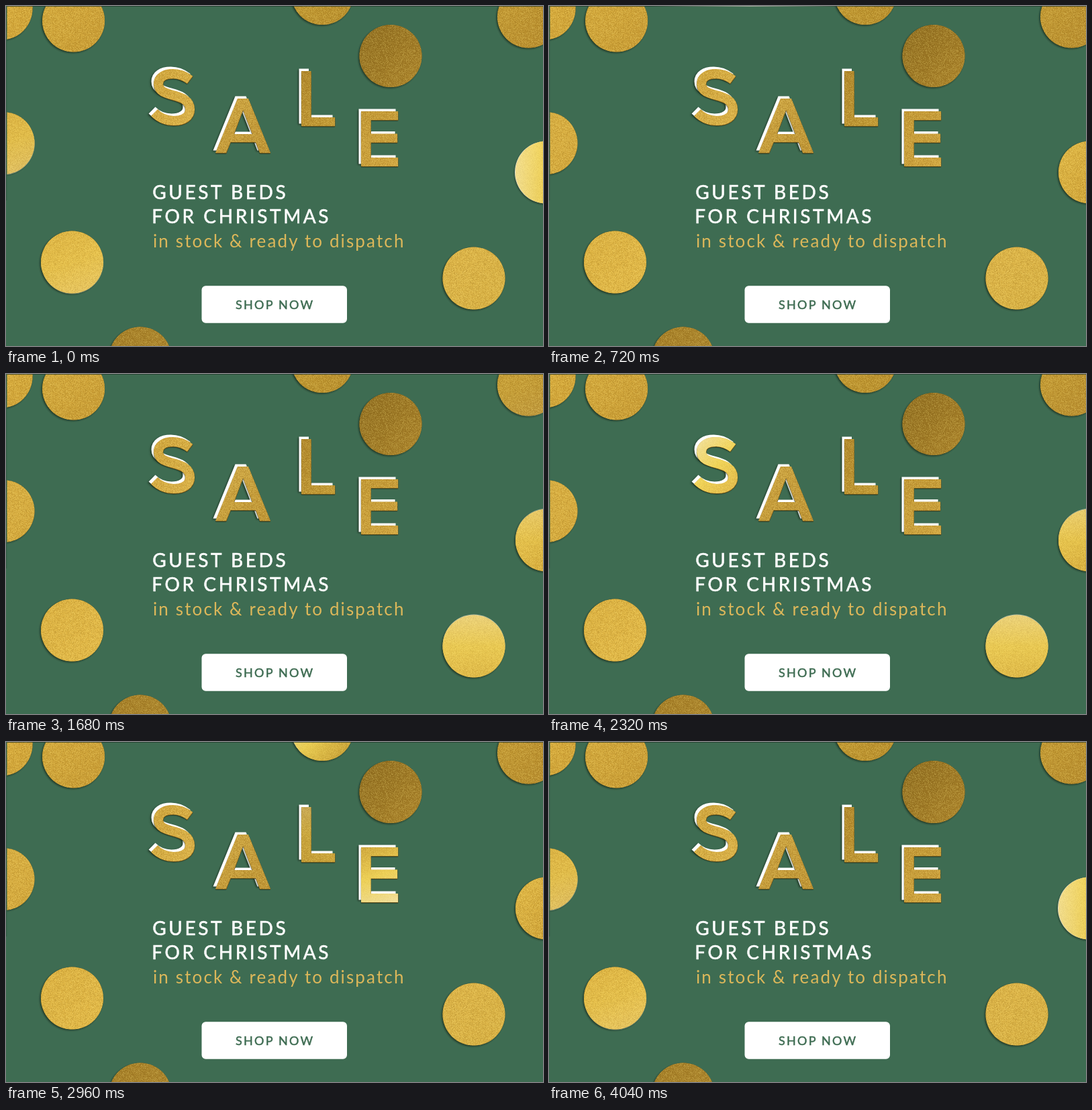
Animation, 800 px wide and 507 px high, one loop 4.08 s. Source, as an HTML page with a canvas:

```html
<!DOCTYPE html>
<html lang="en">
<head>
<meta charset="utf-8">
<title>Sale</title>
<style>
  html, body { margin: 0; width: 100%; height: 100%; overflow: hidden; background: #3e6c52; }
  canvas, svg { position: absolute; left: 0; top: 0; display: block; }
  text { font-family: Lato, "Open Sans", sans-serif; }
  .head { font-size: 28px; letter-spacing: 3.6px; fill: #fff; stroke: #fff; stroke-width: .6px; }
  .sub { font-size: 26px; letter-spacing: 2.13px; fill: #dcb75a; }
  .cta { font-size: 18px; letter-spacing: 2.25px; fill: #3e6c52; stroke: #3e6c52; stroke-width: .5px; }
</style>
</head>
<body>
<canvas width="800" height="507"></canvas>
<svg width="800" height="507">
  <text class="head" x="218.2" y="287.7">GUEST BEDS</text>
  <text class="head" x="217.2" y="324">FOR CHRISTMAS</text>
  <text class="sub" x="219" y="360">in stock &amp; ready to dispatch</text>
  <rect x="291.5" y="417.3" width="216.5" height="55.4" rx="6" fill="#fff"/>
  <text class="cta" x="342" y="451.5">SHOP NOW</text>
</svg>
<script>
const LOOP = 4080, STEP = 40, R = 46.5;
const ctx = document.querySelector('canvas').getContext('2d');

// A glint is [peak time, half duration, strength, angle the light comes from].
const LEFT = Math.PI, TOP = -Math.PI / 2, CORNER = -Math.PI * .75, BELOW = Math.PI * .4;

const disc = (x, y, light, dark, ...glints) => {
  const path = new Path2D();
  path.arc(x, y, R, 0, 7);
  return { path, x, y, r: R, light, dark, glints };
};
const letter = (d, x, y, light, dark, line, ...glints) =>
  ({ path: new Path2D(d), x, y, r: 43, light, dark, line, glints });

const discs = [
  disc(-7, 4, '#dfb340', '#d2a538', [3440, 350, .9, LEFT]),
  disc(100.6, 22, '#d5aa3c', '#cb9e35', [3440, 400, 1, LEFT]),
  disc(471.3, -18.5, '#c79f35', '#b98f2c', [2960, 350, 1, CORNER]),
  disc(573, 74.5, '#937021', '#a88129'),
  disc(778.5, 16, '#c49a33', '#b88d2d', [1900, 500, .2, BELOW]),
  disc(-4, 204.5, '#dbb143', '#d5a93c', [0, 400, .4, BELOW]),
  disc(805.5, 248, '#dfb543', '#d0a337', [0, 450, .9, LEFT], [2020, 620, .9, TOP]),
  disc(98.5, 382, '#deb342', '#e3b947', [60, 450, .3, BELOW]),
  disc(697, 406, '#deb548', '#dab244', [2000, 700, 1, TOP]),
  disc(200, 525, '#a67f27', '#ad862d')
];

const letters = [
  letter('M274 110C266 104 258 101 249 101C235 101 227 107 227 116C227 139 274 127 274 154C274 165 264 171 250 171C238 171 229 167 221 159',
    249, 136, '#d3a83e', '#dcb248', 14, [2320, 420, 1, CORNER]),
  letter('M345 138H361L394 219H378L372 203H334.5L328 219H312ZM353 155L339.5 191H367Z',
    353, 178, '#cda440', '#c09534', 0, [1400, 350, .4, CORNER]),
  letter('M440 97H454.5V166H490V179H440Z',
    465, 138, '#b0872b', '#c39a34', 0, [2960, 350, .4, TOP]),
  letter('M529 157H584V170H543.5V190.5H583V203.5H543.5V226H584V239H529Z',
    557, 198, '#c39834', '#d1a53f', 0, [2960, 380, 1, BELOW])
];

// Fine foil grain
const grain = (() => {
  const tile = document.createElement('canvas');
  tile.width = tile.height = 128;
  const g = tile.getContext('2d');
  let seed = 7;
  const rand = () => (seed = seed * 16807 % 2147483647) / 2147483647;
  for (let i = 0; i < 128 * 128; i++) {
    g.fillStyle = rand() < .5 ? `rgba(255,236,140,${rand() * .24})` : `rgba(90,60,5,${rand() * .16})`;
    g.fillRect(i % 128, i >> 7, 1, 1);
  }
  return ctx.createPattern(tile, 'repeat');
})();

function paint(item, style, dx = 0, dy = 0) {
  ctx.save();
  ctx.translate(dx, dy);
  if (item.line) {
    ctx.lineWidth = item.line;
    ctx.strokeStyle = style;
    ctx.stroke(item.path);
  } else {
    ctx.fillStyle = style;
    ctx.fill(item.path, 'evenodd');
  }
  ctx.restore();
}

function shadowed(item, style, dx, dy, drop = 1.5) {
  ctx.save();
  ctx.shadowColor = 'rgba(20,35,22,.7)';
  ctx.shadowBlur = drop * 2;
  ctx.shadowOffsetX = -drop;
  ctx.shadowOffsetY = drop;
  paint(item, style, dx, dy);
  ctx.restore();
}

// Gradient running from the side at `angle` to the opposite side
function ramp({ x, y, r }, angle, ...colors) {
  const c = Math.cos(angle) * r, s = Math.sin(angle) * r;
  const g = ctx.createLinearGradient(x + c, y + s, x - c, y - s);
  colors.forEach((color, i) => g.addColorStop(i / (colors.length - 1), color));
  return g;
}

// Smooth rise and fall around a peak, wrapping over the loop
function pulse(t, peak, half) {
  const d = Math.abs((t - peak + LOOP * 1.5) % LOOP - LOOP / 2) / half;
  return d < 1 ? (1 - d * d) ** 2 : 0;
}

function gold(item, t) {
  const lit = item.glints.map(([peak, half, power, angle]) => [pulse(t, peak, half) * power, angle]);
  const isDisc = item.r === R;
  if (isDisc) {
    shadowed(item, '#80601b', 0, 0);
    for (const [a, angle] of lit)
      paint(item, `rgba(255,250,225,${a})`, Math.cos(angle), Math.sin(angle));
  } else {
    shadowed(item, '#fff', -3.5, -3.5);
    shadowed(item, '#735617', .4, .8, .6);
  }
  paint(item, ramp(item, CORNER, item.light, item.dark));
  paint(item, grain);
  for (const [a, angle] of lit) if (a)
    paint(item, ramp(item, angle, `rgba(255,246,185,${a * .7})`,
      `rgba(255,232,100,${a * .65})`, `rgba(255,226,90,${a * .25})`));
}

function edgeGlint(t, x, width, peak) {
  const a = pulse(t, peak, 400) * .65;
  const g = ctx.createLinearGradient(x - width, 0, x + width, 0);
  g.addColorStop(0, 'rgba(220,220,205,0)');
  g.addColorStop(.5, `rgba(220,220,205,${a})`);
  g.addColorStop(1, 'rgba(220,220,205,0)');
  ctx.fillStyle = g;
  ctx.fillRect(x - width, 0, width * 2, 1);
}

function draw(now) {
  const t = Math.floor(now % LOOP / STEP) * STEP;
  ctx.fillStyle = '#3e6c52';
  ctx.fillRect(0, 0, 800, 507);
  for (const item of discs) gold(item, t);
  for (const item of letters) gold(item, t);
  ctx.fillStyle = 'rgba(25,45,34,.65)';
  ctx.fillRect(0, 0, 800, 1);
  ctx.fillStyle = '#365f48';
  ctx.fillRect(0, 0, 1.5, 290);
  edgeGlint(t, 300, 150, 720);
  edgeGlint(t, 40, 80, 3440);
}

const start = performance.now();
(function tick() {
  draw(performance.now() - start);
  requestAnimationFrame(tick);
})();
</script>
</body>
</html>
```
